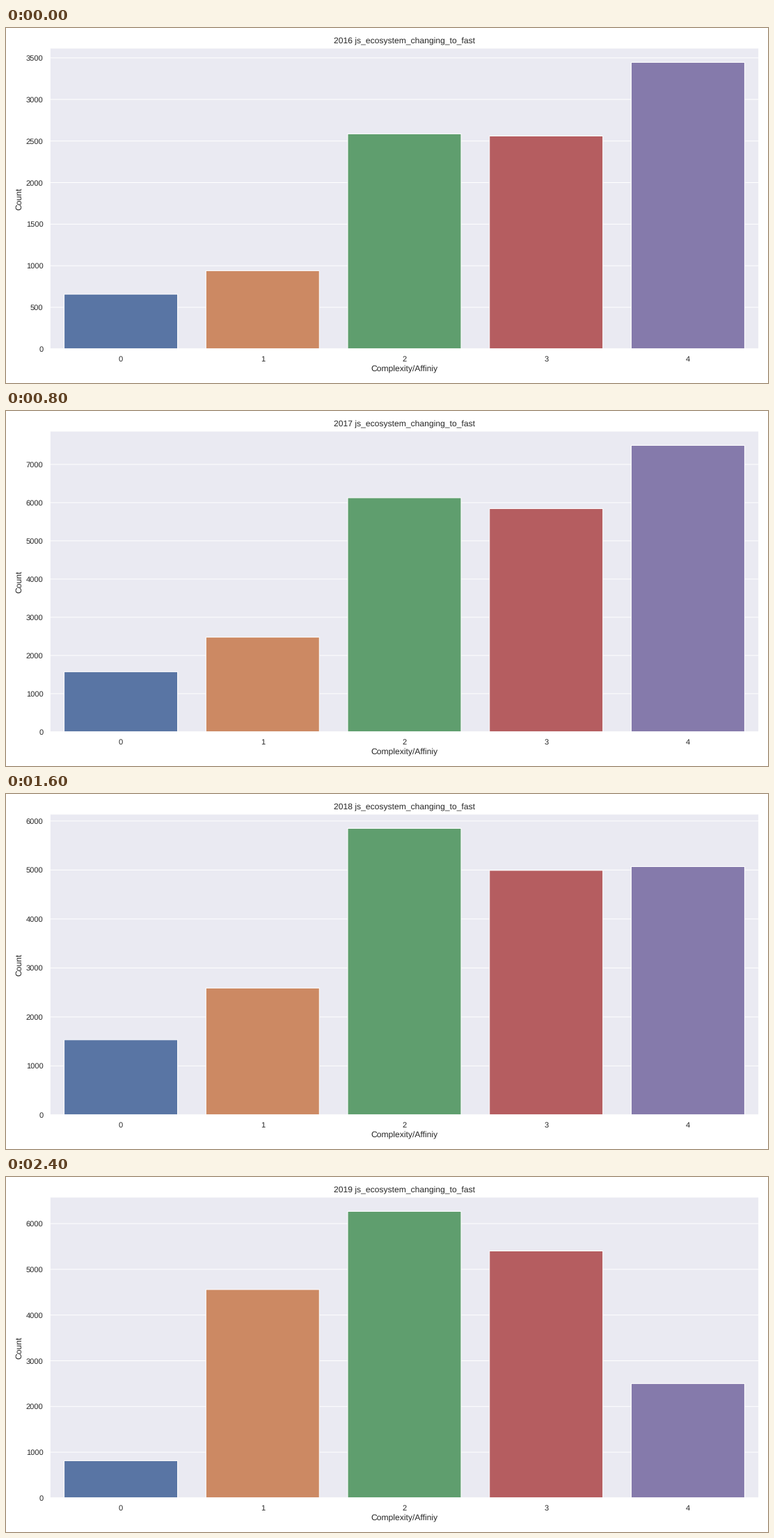
A matplotlib script for the animation above (3.2 s loop, 1095x511 px).

```python
import matplotlib.pyplot as plt
from matplotlib.animation import FuncAnimation

W, H, DPI = 1095, 511, 73
INK = "#262626"
COLORS = ["#5975a4", "#cc8963", "#5f9e6e", "#b55d60", "#857aab"]
FIRST_YEAR = 2016

# Survey answers per year, from "disagree" to "agree"
COUNTS = [
    [658, 940, 2586, 2560, 3445],
    [1574, 2478, 6127, 5843, 7498],
    [1533, 2590, 5849, 4992, 5069],
    [813, 4558, 6267, 5401, 2501],
]

plt.rcParams.update({
    "font.family": "Liberation Sans",
    "text.color": INK,
    "text.hinting": "none",
    "path.snap": False,
    "axes.labelcolor": INK,
    "axes.facecolor": "#eaeaf2",
    "axes.edgecolor": "white",
    "axes.linewidth": 1.25,
    "axes.axisbelow": True,
    "axes.titlesize": 12,
    "axes.labelsize": 12,
})


def make_axes(fig, left, right, top, bottom):
    """Place axes by pixel edges measured from the top left corner."""
    return fig.add_axes([left / W, 1 - bottom / H,
                         (right - left) / W, (bottom - top) / H])


fig = plt.figure(figsize=(W / DPI, H / DPI), dpi=DPI, facecolor="white")
ax = make_axes(fig, left=63.2, right=1081.8, top=28.9, bottom=461.9)
bars = ax.bar(range(len(COLORS)), COUNTS[0], width=0.8, color=COLORS,
              edgecolor="white", linewidth=1)
ax.set_xlim(-0.5, len(COLORS) - 0.5)
ax.set_xticks(range(len(COLORS)))
ax.tick_params(length=6, pad=3.5, labelsize=11, labelcolor=INK,
               left=False, bottom=False)
ax.grid(axis="y", color="white", linewidth=1)
ax.set_xlabel("Complexity/Affiniy")
ax.set_ylabel("Count")


def draw(i):
    for bar, count in zip(bars, COUNTS[i]):
        bar.set_height(count)
    ax.set_ylim(0, 1.05 * max(COUNTS[i]))
    ax.set_title(f"{FIRST_YEAR + i} js_ecosystem_changing_to_fast")
    return list(bars)


anim = FuncAnimation(fig, draw, frames=len(COUNTS), interval=800,
                     repeat=True, repeat_delay=0, blit=False)
plt.show()
```
